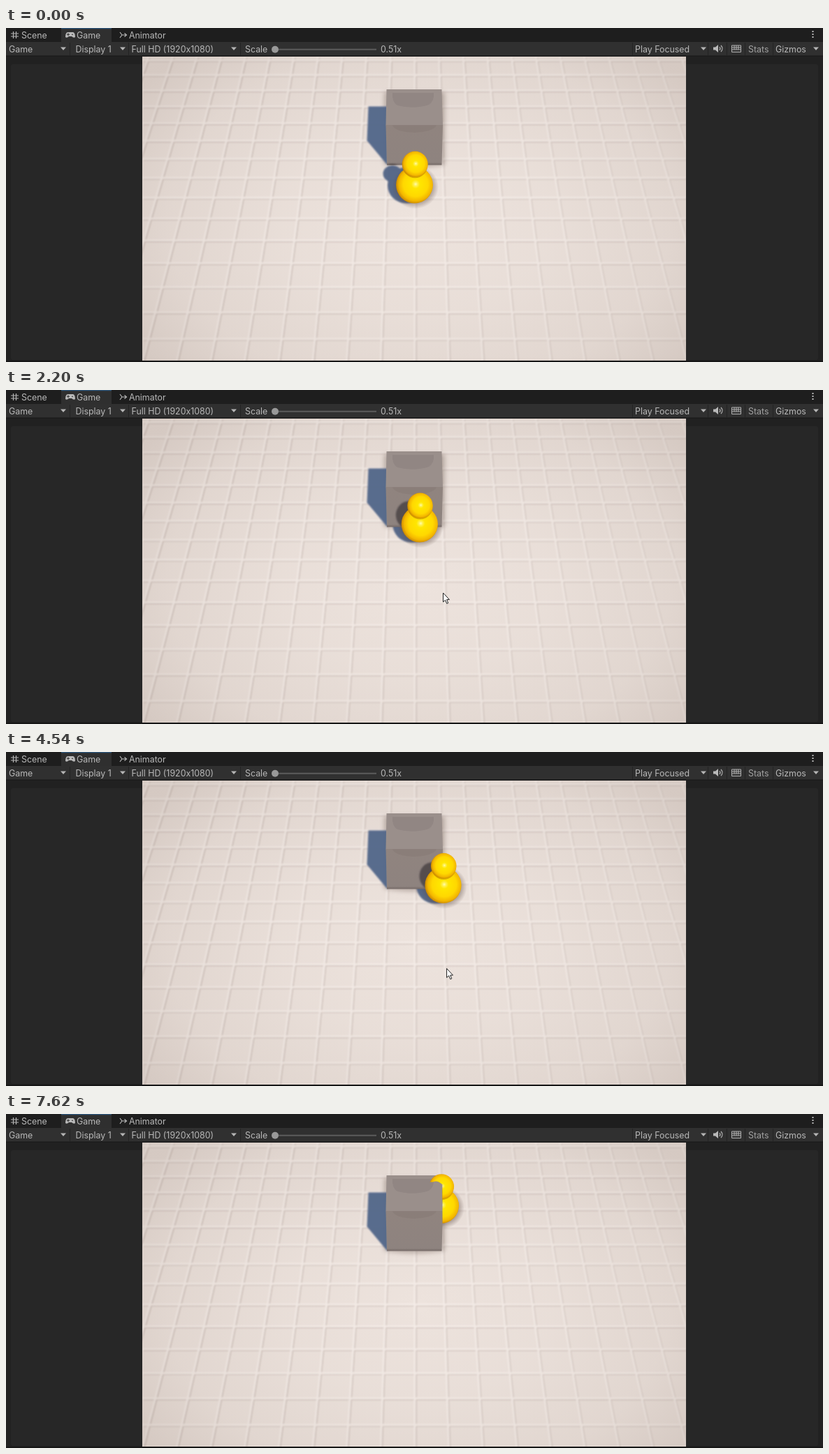
Write an HTML page that moves like this. It is 1169 px wide and 479 px high and loops after 7.67 s.

```html
<!DOCTYPE html>
<html lang="en">
<head>
<meta charset="utf-8">
<title>Duck walk</title>
<style>
  html, body { margin: 0; width: 100%; height: 100%; overflow: hidden; background: #212121; }
  svg { display: block; width: 1169px; height: 479px; }
  text { font: 12.4px Inter, Roboto, sans-serif; fill: #b8b8b8; }
  .dim { fill: #a2a2a2; }
</style>
</head>
<body>
<svg viewBox="0 0 1169 479">
  <defs>
    <radialGradient id="vignette" gradientUnits="userSpaceOnUse" cx="0" cy="0" r="1"
      gradientTransform="translate(590 275) scale(480 330)">
      <stop offset="0" stop-color="#5a4438" stop-opacity="0"/>
      <stop offset=".4" stop-color="#5a4438" stop-opacity=".03"/>
      <stop offset=".75" stop-color="#5a4438" stop-opacity=".08"/>
      <stop offset="1" stop-color="#5a4438" stop-opacity=".16"/>
    </radialGradient>
    <radialGradient id="yellow" cx=".53" cy=".48" r=".54">
      <stop offset="0" stop-color="#fffbb0"/>
      <stop offset=".1" stop-color="#fff04c"/>
      <stop offset=".22" stop-color="#ffe600"/>
      <stop offset=".62" stop-color="#ffd800"/>
      <stop offset=".84" stop-color="#f3b600"/>
      <stop offset="1" stop-color="#c48200"/>
    </radialGradient>
    <radialGradient id="contact">
      <stop offset=".65" stop-color="#5f4d47" stop-opacity=".55"/>
      <stop offset="1" stop-color="#5f4d47" stop-opacity="0"/>
    </radialGradient>
    <linearGradient id="front" x2="0" y2="1">
      <stop offset="0" stop-color="#90847f"/>
      <stop offset=".93" stop-color="#8e837f"/>
      <stop offset="1" stop-color="#756a67"/>
    </linearGradient>
    <clipPath id="stage"><rect x="195" y="41" width="778" height="436"/></clipPath>
    <clipPath id="face"><path d="M543.5 139H625L623.5 196.5H545Z"/></clipPath>
    <clipPath id="visible"><path id="visiblePath"/></clipPath>
    <filter id="soft" x="-10%" y="-10%" width="120%" height="120%"><feGaussianBlur stdDeviation=".8"/></filter>
    <filter id="blur" x="-20%" y="-20%" width="140%" height="140%"><feGaussianBlur stdDeviation="3"/></filter>
  </defs>

  <!-- editor frame -->
  <rect width="1169" height="479" fill="#212121"/>
  <rect width="1169" height="20" fill="#1e1e1e"/>
  <rect x="79" width="72" height="20" fill="#2f2f2f"/>
  <rect x="79" width="72" height="1.2" fill="#2b567c"/>
  <rect y="20" width="1169" height="20" fill="#303030"/>
  <rect y="39.5" width="1169" height="1.5" fill="#1b1b1b"/>
  <rect x="7" y="52" width="1155" height="424" rx="3" fill="#272727"/>
  <rect y="477" width="1169" height="2" fill="#171717"/>
  <path id="separators" stroke="#232323"/>
  <path id="arrows" fill="#b5b5b5"/>
  <g fill="none" stroke="#b4b4b4" stroke-width="1.2">
    <path d="M10.5 5V15M14.5 5V15M7 8H18M7 12H18"/>
    <path d="M163 6L166 10L163 14M166 10H172M169.5 7.5L172.5 10L169.5 12.5"/>
    <path d="M1021 27Q1023 29.5 1021 32M1023 25Q1027 29.5 1023 34"/>
    <path d="M1038.5 25H1051.500V34.500H1038.500ZM1039 28H1051M1039 31H1051M1042 25V31M1045 25V31M1048 25V31" stroke-width="1"/>
  </g>
  <g fill="#b9b9b9">
    <path d="M88 6H96Q99 7 99 13Q97 15 94 12H90Q87 15 85 13Q85 7 88 6Z"/>
    <path d="M1012 27.500H1015L1019 24V35L1015 31.500H1012Z"/>
    <path d="M1153.500 4h2v2h-2zm0 4h2v2h-2zm0 4h2v2h-2z"/>
  </g>
  <path d="M87 9.300H91M89 7.300V11.300M94 9.300H96" stroke="#2f2f2f"/>
  <path d="M390 30.700H530" stroke="#5c5c5c" stroke-width="2"/>
  <circle cx="385" cy="30.700" r="5" fill="#999"/>
  <text x="22" y="14.500">Scene</text>
  <text x="101" y="14.500">Game</text>
  <text x="176" y="14.500">Animator</text>
  <text x="4" y="34.500">Game</text>
  <text x="99.500" y="34.500">Display 1</text>
  <text x="179.500" y="34.500">Full HD (1920x1080)</text>
  <text x="342" y="35">Scale</text>
  <text x="536" y="35">0.51x</text>
  <text x="900" y="34.500">Play Focused</text>
  <text x="1062" y="34.500" class="dim">Stats</text>
  <text x="1101" y="34.500">Gizmos</text>

  <g clip-path="url(#stage)">
    <rect x="195" y="41" width="778" height="436" fill="#ede3dd"/>
    <g fill="none" filter="url(#soft)">
      <path id="grooveShade" stroke="#cdc0ba" stroke-width="1.800" transform="translate(1.800 1.700)"/>
      <path id="grooveLight" stroke="#f5ede8" stroke-width="2.800"/>
    </g>
    <rect x="195" y="41" width="778" height="436" fill="url(#vignette)"/>

    <!-- block and shadows -->
    <path d="M541 92H628V196Q584 204 541 196Z" fill="#75635c" opacity=".4" filter="url(#blur)"/>
    <path d="M518.500 112.500H546V197L516.500 161.500Z" fill="#53678a" opacity=".96" filter="url(#soft)"/>
    <g fill="#4d6083" opacity=".93" filter="url(#soft)">
      <ellipse id="bodyShadow" rx="27" ry="26"/>
      <ellipse id="headShadow" rx="13.500" ry="12"/>
    </g>
    <ellipse id="contactShade" fill="url(#contact)"/>
    <path d="M544.500 88H623.500L625 139.500H543.500Z" fill="#9a8f8b"/>
    <path d="M553 93H612Q613 105 605 110Q584 117 560 111Q552 106 553 93Z" fill="#918683"/>
    <path d="M543.500 139H625L623.500 196.500H545Z" fill="url(#front)"/>
    <path d="M553 139.500H616Q611 149 584 150Q557 149 553 139.500Z" fill="#877b75" opacity=".6"/>
    <g clip-path="url(#face)">
      <ellipse id="faceShadow" fill="#463f42" filter="url(#soft)"/>
    </g>

    <!-- duck -->
    <g clip-path="url(#visible)">
      <circle id="body" fill="url(#yellow)"/>
      <ellipse id="neck" fill="#b97f00" opacity=".5"/>
      <circle id="head" fill="url(#yellow)"/>
      <ellipse id="eyeA" ry="2.900" fill="#4b3b05"/>
      <ellipse id="eyeB" ry="2.900" fill="#4b3b05"/>
    </g>
  </g>
  <path id="cursor" d="M0 0V13L3 10.300L5.200 15.300L7.200 14.400L5.100 9.600H8.900Z" fill="#fff" stroke="#222"/>
</svg>
<script>
const LOOP = 7670;
const TURN_MS = 260;
const BOB_MS = 341.5;
const $ = id => document.getElementById(id);
const clamp = v => Math.min(1, Math.max(0, v));
const mix = (a, b, k) => a + (b - a) * k;
const set = (id, attrs) => {
  for (const name in attrs) $(id).setAttribute(name, attrs[name]);
};

set('arrows', { d: [82, 167, 326, 998, 1159].map(x => `M${x - 4} 27.500h8l-4 4.500z`).join('') });
set('separators', { d: [91, 175, 335, 896, 1004, 1031, 1057, 1097].map(x => `M${x}.500 21v18`).join('') });

// Floor grid in perspective: both directions share one vanishing height.
const HORIZON = -1038, CENTER = 585;
const rowY = n => HORIZON + 56348 / (44.97 - n);
const columnX = (n, y) => CENTER + n * 0.0321 * (y - HORIZON);
let grid = '';
for (let n = -7; n <= 8; n++) grid += `M195 ${rowY(n)}H973`;
for (let n = -12; n <= 12; n++) grid += `M${columnX(n, 41)} 41L${columnX(n, 477)} 477`;
set('grooveShade', { d: grid });
set('grooveLight', { d: grid });

// Waypoints: time, x, y
const WALK = [
  [0, 584.5, 225], [940, 584.5, 225], [1420, 626, 225], [1850, 591, 225],
  [2280, 592, 185], [2570, 591, 212], [2990, 617, 212], [3180, 623, 219.5],
  [3500, 625, 217], [3950, 625.5, 191], [4960, 625.5, 191], [5680, 622.5, 131.5], [LOOP, 622.5, 131.5]
];
const POINTER = [
  [0, 715, 550], [800, 629, 280], [2200, 625.5, 291], [4960, 631.5, 314],
  [6550, 631.5, 314.5], [7200, 748, 450], [7400, 687, 479], [LOOP, 680, 500]
];

function along(path, t) {
  const i = path.findIndex(p => p[0] > t);
  const [a, b] = [path[i - 1], path[i]];
  const k = (t - a[0]) / (b[0] - a[0]);
  return { x: mix(a[1], b[1], k), y: mix(a[2], b[2], k), leg: i, since: t - a[0] };
}

// Direction of a leg in degrees: 0 towards the viewer, 90 right; resting looks away.
function heading(leg) {
  if (leg < 1) return 180;
  const dx = WALK[leg][1] - WALK[leg - 1][1], dy = WALK[leg][2] - WALK[leg - 1][2];
  return dx || dy ? Math.atan2(dx, dy) * 180 / Math.PI : 180;
}

function facing({ leg, since }) {
  const from = heading(leg - 1);
  const turn = (heading(leg) - from + 540) % 360 - 180;
  const k = clamp(since / TURN_MS);
  return from + turn * k * k * (3 - 2 * k);
}

function placeEye(id, yawDeg, cx, cy, r) {
  const yaw = yawDeg * Math.PI / 180, up = 0.342, out = 0.94;
  const side = out * Math.sin(yaw), toward = out * Math.cos(yaw);
  const depth = toward * 0.72 + up * 0.69;
  set(id, {
    cx: cx + r * side, cy: cy + r * (toward * 0.69 - up * 0.72),
    rx: 0.2 + 1.7 * Math.sqrt(1 - side * side),
    visibility: depth > 0.1 ? 'visible' : 'hidden'
  });
}

function draw(t) {
  const duck = along(WALK, t), { x, y } = duck;
  const r = 24.2 + 0.01 * y, headR = r * 0.7;
  const lift = 28 + 1.7 * Math.cos(2 * Math.PI * (t - 1030) / BOB_MS);
  const headX = x + 0.7, headY = y - lift, yaw = facing(duck);

  set('body', { cx: x, cy: y, r });
  set('head', { cx: headX, cy: headY, r: headR });
  set('neck', { cx: headX, cy: headY + 2.5, rx: headR * 0.96, ry: headR * 0.94 });
  placeEye('eyeA', yaw - 21, headX, headY, headR);
  placeEye('eyeB', yaw + 21, headX, headY, headR);

  set('bodyShadow', { cx: x - 11.5, cy: y + 0.5 });
  set('headShadow', { cx: x - 31.5, cy: y - 16 });
  set('contactShade', { cx: x + 1, cy: y + 3, rx: r + 7, ry: r + 5 });

  // Near the block the head's shadow climbs its front face.
  const near = clamp((218 - y) / 24);
  set('faceShadow', {
    cx: x - mix(32, 15, near), cy: y - mix(17, 13, near),
    rx: mix(14, 19, near), ry: mix(13, 20, near),
    opacity: 0.8 * clamp((y - 160) / 22)
  });

  // The block swallows the left half as the duck walks into it.
  const sunk = clamp((180 - y) / 35);
  const left = sunk ? mix(594, 624.5, sunk) : 195;
  const crown = sunk > 0.8 ? 'M600 70H625V101.500Q617 94 611 97.500H600Z' : '';
  set('visiblePath', { d: `M${left} 41H973V477H${left}Z${crown}` });

  const tip = along(POINTER, t);
  set('cursor', {
    transform: `translate(${tip.x} ${tip.y})`,
    visibility: tip.y < 479 ? 'visible' : 'hidden'
  });
}

const start = performance.now();
function tick() {
  draw((performance.now() - start) % LOOP);
  requestAnimationFrame(tick);
}
draw(0);
requestAnimationFrame(tick);
</script>
</body>
</html>
```
